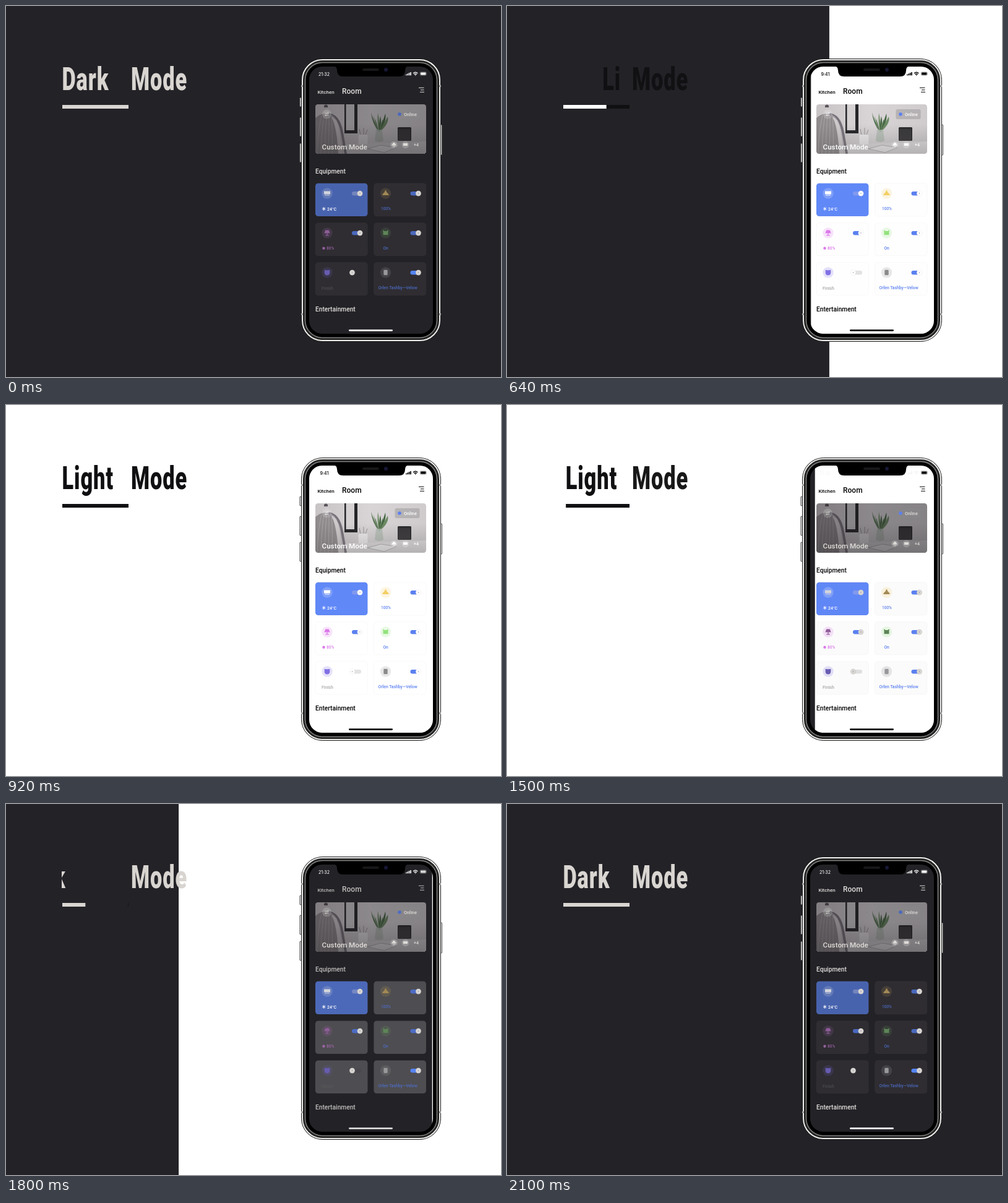
An HTML page that plays this animation: 800 by 600 pixels, repeating every 2640 ms.

```html
<!DOCTYPE html>
<html lang="en">
<head>
<meta charset="utf-8">
<title>Dark and light mode</title>
<style>
html, body { margin: 0; width: 100%; height: 100%; overflow: hidden; background: #232227; }
svg { display: block; width: 800px; height: 600px; font-family: Roboto, Inter, sans-serif; font-weight: 500; }
.head { font-size: 52px; font-weight: 900; letter-spacing: 1.4px; }
.time { font: 500 7px Inter, sans-serif; }
[data-k] { fill: currentColor; }
.line { fill: none; stroke: currentColor; }
</style>
</head>
<body>
<svg viewBox="0 0 800 600" id="stage"></svg>
<script>
const BG = '#232227', PALE = '#d9d5d1', INK = '#101012';

// Colour pair; k names the progress that mixes it
const ink = (k, dark, light) => `data-k="${k}" data-d="${dark}" data-l="${light}"`;
const rect = (x, y, w, h, r, more) => `<rect x="${x}" y="${y}" width="${w}" height="${h}" rx="${r}" ${more}/>`;
const circle = (x, y, r, more) => `<circle cx="${x}" cy="${y}" r="${r}" ${more}/>`;
const path = (d, more) => `<path d="${d}" ${more}/>`;
const text = (x, y, size, s, more) => `<text x="${x}" y="${y}" font-size="${size}" ${more}>${s}</text>`;
const clip = (id, shape) => `<clipPath id="${id}">${shape}</clipPath>`;
const head = (x, s, more) => `<g transform="translate(${x} 135.5) scale(.66 1)"><text class="head" ${more}>${s}</text></g>`;

const main = ink('c', '#e2dfdb', '#000000');
const onPhoto = ink('h', '#dedbd7', '#ffffff');
const blue = ink('c', '#4a68bd', '#5b80f0');

function heading() {
  return `<g clip-path="url(#word)"><g id="dark">${head(90.5, 'Dark', `fill="${PALE}"`)}</g>
    <g id="light">${head(90.5, 'Light', `fill="${INK}"`)}</g></g>
    ${head(202, 'Mode', ink('m', PALE, INK))}
    <g clip-path="url(#rule)">${rect(91, 160, 107, 6, 0, 'id="paleLine" ' + ink('m', PALE, '#ffffff'))}
    ${rect(91, 160, 107, 6, 0, `id="inkLine" fill="${INK}"`)}</g>`;
}

function button(x, y, h) {
  return rect(x, y, 2.4, h, 1, 'fill="#e6e6e4" stroke="#1a1a1c" stroke-width=".7"');
}

function body() {
  const ring = (inset, fill, stroke, w) => rect(477 + inset, 85 + inset, 226 - 2 * inset, 458 - 2 * inset, 34.5 - inset,
    `fill="${fill}" stroke="${stroke}" stroke-width="${w}"`);
  const band = [[477, 128], [477, 497], [700, 128], [700, 497]].map(([x, y]) => rect(x, y, 3, 3, 0, 'fill="#a5a5a3"')).join('');
  return button(474.8, 148, 15) + button(474.8, 180, 31) + button(474.8, 222, 31) + button(702.3, 192, 49)
    + ring(.5, '#111', '#1c1c1e', 1) + ring(2, '#111', '#f1f1ee', 2) + band
    + ring(4.5, '#111', '#2b2b2c', 1.5) + ring(6.5, '#000', '#858684', 1.5) + ring(9, '#000', '#000', 2);
}

function statusBar() {
  const k = ink('h', '#f4f4f4', '#000000');
  const bars = [0, 1, 2, 3].map(i => rect(646 + i * 2.4, 110.5 - i * 1.2, 1.7, 1.8 + i * 1.2, .4, k)).join('');
  return text(505, 112.5, 7, '21:32', 'class="time" id="late" fill="#f4f4f4"')
    + text(507.5, 112.5, 7, '9:41', 'class="time" id="early"') + bars
    + path('M658 109 Q661.7 105.6 665.4 109 M659.6 110.7 Q661.7 108.8 663.8 110.7', k + ' class="line" stroke-width="1.3"')
    + circle(661.7, 112, .8, k)
    + rect(669, 106.8, 10.5, 5.4, 1.6, 'fill="none" stroke="#8a8a8a" stroke-width=".6"')
    + rect(670, 107.6, 8.5, 3.8, .8, ink('c', '#ffffff', '#000000'))
    + path('M535 98 H645 V104 Q645 114 635 114 H545 Q535 114 535 104Z M529 97 Q535 98 535 104 V97Z M651 97 Q645 98 645 104 V97Z', 'fill="#000"')
    + rect(576, 101, 27, 4, 2, 'fill="#17171a"') + circle(614, 103, 3, 'fill="#171737"');
}

function photo() {
  const leaves = [-12, -8, -5, -1, 3, 7, 11, 15].map((dx, i) => {
    const top = 172 + i * 5 % 14;
    return path(`M603 204 Q${600 + dx * .7} 190 ${602 + dx} ${top} Q${605 + dx} ${top + 12} 603 204Z`,
      `fill="${i % 2 ? '#6c8a62' : '#476745'}"`);
  }).join('');
  const weave = [0, 1, 2, 3, 4].map(i => `M${503 + i * 6} 239 Q${504 + i * 6} 200 ${510 + i * 4} 177`).join('');
  return `<g clip-path="url(#photo)">
    ${rect(500, 159, 179, 80, 0, 'fill="url(#wall)"')}
    ${path('M545 224 L679 219 V239 H545Z', 'fill="#e2dee0"')}
    ${rect(547, 155, 21, 51, 0, 'fill="#252427"')}${rect(549.5, 155, 13.5, 46, 0, 'fill="#d5d1d3"')}
    ${path('M500 239 V181 Q508 173 520 174 Q534 180 537 239Z', 'fill="#908b8d"')}
    ${path(weave, 'fill="none" stroke="#a9a4a6"')}
    ${path('M520 175 Q538 176 543 205 L549 239', 'fill="none" stroke="#77727a" stroke-width="4"')}
    ${path('M524 176 Q536 180 540 205 L545 239', 'fill="none" stroke="#b9b4b6"')}
    ${path('M514 161 q3 -3 6 0 v3 h-6z', 'fill="#5b565b"')}
    ${rect(569.5, 208, 15, 16, 2, 'fill="#efecee"')}${path('M573 208 L571 199 M578 208 V197 M581 208 L584 200', 'stroke="#9b9496"')}
    ${leaves}${path('M598 200 H608 L610 218 Q603 222 596 218Z', 'fill="#b4beb4" fill-opacity=".8"')}
    ${path('M584 231 L606 225 L631 229 L611 237Z', 'fill="#f3f1f2" stroke="#a39c9f" stroke-width=".7"')}
    ${rect(633, 196, 22, 22, 1.5, 'fill="#2a292b"')}${rect(634, 199, 19, 18, 1, 'fill="#383638"')}
    ${rect(500, 159, 179, 80, 0, 'fill="url(#fall)"')}
    ${rect(500, 159, 179, 80, 0, 'id="shade" fill="#17141a"')}</g>
    ${circle(518.5, 175, 7.5, 'fill="#fff" fill-opacity=".18"')}
    ${path('M515.5 173.7 H521.5 L519.8 172 M521.5 176.3 H515.5 L517.2 178', onPhoto + ' class="line" stroke-width=".9"')}
    ${rect(628.5, 167, 40, 16, 2.5, 'fill="#8b878a" fill-opacity=".4"')}${circle(636, 175, 2.8, blue)}
    ${text(643, 177.7, 7.3, 'Online', onPhoto)}${text(510.5, 231.5, 11.7, 'Custom Mode', onPhoto)}
    ${[627, 645.5].map(x => circle(x, 224.5, 5.8, 'fill="#fff" fill-opacity=".2"')).join('')}
    ${path('M626 221 h2 l3 4.5 h-8z M625 226.5 h4 v1 h-4z M642 222 h7 v4 h-7z', onPhoto)}
    ${text(659, 227, 7, '+4', onPhoto)}`;
}

const icons = {
  ac: 'M-5 -3.5 H5 V1.5 H-5Z M-3.5 2.6 H-1.5 V3.8 H-3.5Z M-.8 2.6 H.8 V3.8 H-.8Z M1.5 2.6 H3.5 V3.8 H1.5Z',
  pendant: 'M-1.2 -4.5 H1.2 V-2.5 L5 1.5 V3 H-5 V1.5 L-1.2 -2.5Z',
  lamp: 'M-2.8 -4.5 H2.8 L4.6 .5 H-4.6Z M-.6 .5 H.6 V3.3 H2.8 V4.4 H-2.8 V3.3 H-.6Z',
  box: 'M-4 -3 H4 V3.2 H-4Z M-4.5 -4 H-2.5 V-3 H-4.5Z M2.5 -4 H4.5 V-3 H2.5Z',
  clock: 'M-4.3 -4.3 L-2 -3.7 H2 L4.3 -4.3 V.5 Q4 4.5 0 4.5 Q-4 4.5 -4.3 .5Z',
  speaker: 'M-2 -4.2 H2 Q3.2 -4.2 3.2 -3 V3 Q3.2 4.2 2 4.2 H-2 Q-3.2 4.2 -3.2 3 V-3 Q-3.2 -4.2 -2 -4.2Z'
};

function card(col, row, icon, dark, light, fill, track, on = true) {
  const x = 500 + col * 94.5, y = 286.7 + row * 64, cx = x + 19, cy = y + 16.3, tx = x + 59;
  const knob = on ? tx + 13 : tx + .5;
  return rect(x, y, 84.4, 53.3, 4.5, fill + ' stroke="#888" stroke-opacity=".05"')
    + circle(cx, cy, 8.7, ink('c', dark, light) + ' fill-opacity=".2"')
    + `<g transform="translate(${cx} ${cy})">${path(icons[icon], ink('h', dark, light))}</g>`
    + rect(tx, y + 13.2, 15, 6.5, 3.2, track)
    + circle(knob, y + 16.4, 4.4, ink('h', '#d8d5d2', '#ffffff') + ' stroke="#777" stroke-opacity=".08"')
    + rect(knob - .4, y + 15.4, .8, 2, 0, 'fill="#8b90a8"');
}

function cards() {
  const plain = ink('c', '#2f2d32', '#ffffff');
  const pink = ink('c', '#95609f', '#dd78ec');
  return card(0, 0, 'ac', '#d3d5dc', '#ffffff', ink('c', '#4863ae', '#6088f7'), ink('c', '#7485bd', '#8199ee'))
    + card(1, 0, 'pendant', '#a38955', '#f3cf63', plain, blue)
    + card(0, 1, 'lamp', '#8f5d9a', '#dc78ea', plain, blue)
    + card(1, 1, 'box', '#5d8557', '#92e27c', plain, blue)
    + card(0, 2, 'clock', '#675cb0', '#8070e4', plain, ink('c', '#2f2d32', '#e3e3e3'), false)
    + card(1, 2, 'speaker', '#98979a', '#8a8a8a', plain, ink('c', '#5585f5', '#5b80f0'))
    + path('M513.7 325 V331 M511.1 326.5 L516.3 329.5 M511.1 329.5 L516.3 326.5', 'stroke="#fff" stroke-width=".9"')
    + text(519, 330.5, 7, '24°C', 'fill="#fff"') + text(606, 330.3, 6.5, '100%', blue)
    + circle(513.5, 391.7, 2.2, pink) + text(518, 394.3, 6.5, '80%', pink)
    + text(609.5, 394.3, 6.7, 'On', blue) + text(510, 459, 7, 'Finish', ink('c', '#4b4a4d', '#a8a8a8'))
    + text(601.5, 458.3, 6.8, 'Orlen Tashby—Velow', blue);
}

const stage = document.getElementById('stage');
stage.innerHTML = `<defs>
  ${clip('word', rect(90, 80, 94.5, 75, 0, ''))}${clip('rule', rect(91, 155, 107, 16, 0, ''))}
  ${clip('screen', rect(490, 98, 200, 432, 21, ''))}${clip('photo', rect(500, 159, 179, 80, 4.5, ''))}
  <linearGradient id="wall"><stop stop-color="#c8c3c5"/><stop offset=".5" stop-color="#d9d5d7"/><stop offset="1" stop-color="#cfcbcd"/></linearGradient>
  <linearGradient id="fall" x2="0" y2="1"><stop offset=".4" stop-color="#555" stop-opacity="0"/><stop offset="1" stop-color="#555" stop-opacity=".32"/></linearGradient>
  </defs>
  ${rect(0, 0, 800, 600, 0, `fill="${BG}"`)}${rect(0, 0, 800, 600, 0, 'id="page" fill="#fff"')}
  ${heading()}${body()}
  <g clip-path="url(#screen)">${rect(490, 98, 200, 432, 0, `fill="${BG}"`)}${rect(490, 98, 200, 432, 0, 'id="panel" fill="#fff"')}</g>
  ${statusBar()}
  ${text(503.5, 142, 8, 'Kitchen', main)}${text(543, 142, 12, 'Room', main)}
  ${path('M667 132.3 H675.5 M670 135.7 H675.5 M669 139.2 H676', main + ' class="line" stroke-width="1.1"')}
  ${photo()}${text(500, 271, 10.2, 'Equipment', main)}${cards()}${text(500, 494, 10.2, 'Entertainment', main)}
  ${rect(554, 523.3, 71, 2.6, 1.3, ink('c', '#ffffff', '#000000'))}`;

const $ = id => document.getElementById(id);
const inked = [...stage.querySelectorAll('[data-k]')];
const rgb = hex => [1, 3, 5].map(i => parseInt(hex.slice(i, i + 2), 16));
const mix = (a, b, p) => `rgb(${rgb(a).map((v, i) => Math.round(v + (rgb(b)[i] - v) * p))})`;
const slide = (id, dx) => $(id).setAttribute('transform', `translate(${dx} 0)`);

// cubic-bezier(.25, .1, .25, 1)
function ease(x) {
  if (x <= 0) return 0;
  if (x >= 1) return 1;
  let lo = 0, hi = 1;
  for (let i = 0; i < 24; i++) {
    const s = (lo + hi) / 2;
    if (.75 * s * (1 - s) + s ** 3 < x) lo = s; else hi = s;
  }
  return .3 * lo * (1 - lo) ** 2 + 3 * lo * lo * (1 - lo) + lo ** 3;
}

// The light area of a box, wiped in from the right or out from the left
function wipe(id, x, w, p, toDark) {
  $(id).setAttribute('x', x + w * (toDark ? p : 1 - p));
  $(id).setAttribute('width', w * (toDark ? 1 - p : p));
}

function draw(now) {
  const t = Math.floor(now % 2640 / 20) * 20;
  const toDark = t < 320 || t >= 1480;
  const e = t < 320 ? t + 1160 : t - (toDark ? 1480 : 320);
  const a = ease(e / 358), b = ease((e - 240) / 358);
  const lit = p => toDark ? 1 - p : p;
  const level = { m: lit(a), c: lit(ease(e / (toDark ? 580 : 358))), h: lit(e > 0 ? 1 : 0) };

  for (const el of inked) el.style.color = mix(el.dataset.d, el.dataset.l, level[el.dataset.k]);
  wipe('page', 0, 800, b, toDark);
  wipe('panel', 490, 200, a, toDark);
  slide('dark', toDark ? -107 * (1 - b) : -98 * a);
  slide('light', toDark ? 107 * a : 98 * (1 - b));
  slide('paleLine', toDark ? -107 * (1 - b) : 0);
  slide('inkLine', 107 * (toDark ? a : 1 - b));
  $('late').style.opacity = 1 - level.h;
  $('early').style.opacity = level.h;
  $('shade').style.opacity = .4 * (1 - level.h);
}

const start = performance.now();
function tick() {
  draw(performance.now() - start);
  requestAnimationFrame(tick);
}
tick();
</script>
</body>
</html>
```
